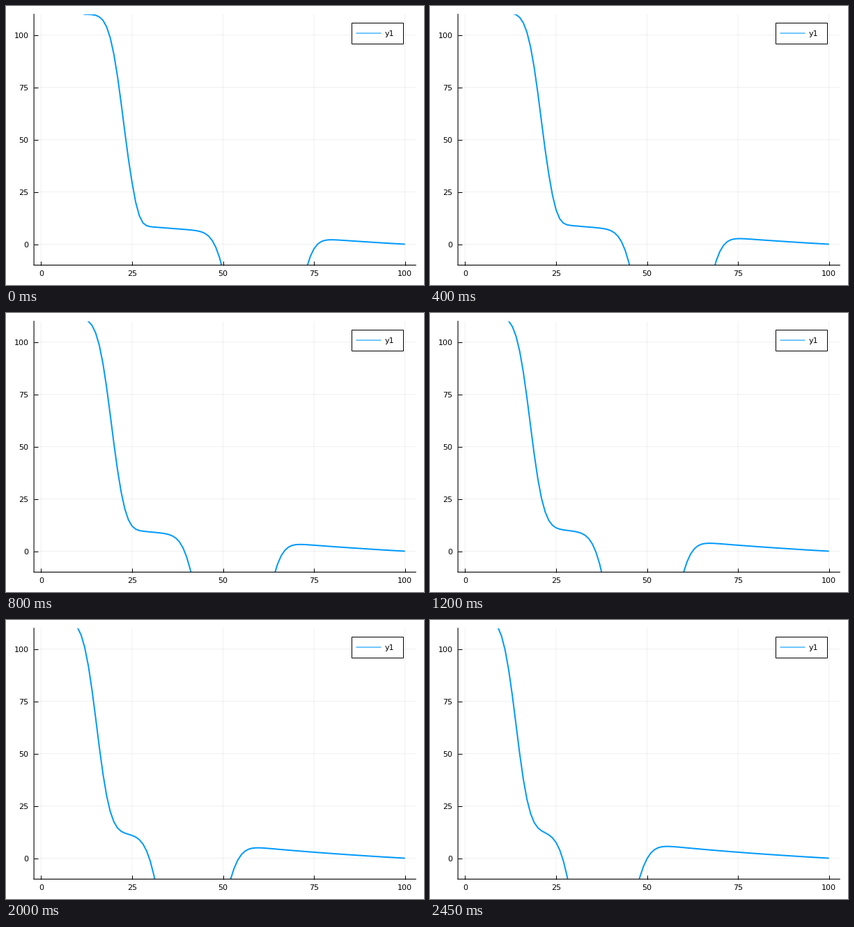
These frames come from a looping animation (600 by 400 pixels, 2.5 s). A matplotlib script:

```python
import math

import matplotlib.pyplot as plt
import numpy as np
from matplotlib.animation import FuncAnimation
from matplotlib.patches import Rectangle
from matplotlib.transforms import Affine2D

W, H, DPI = 600, 400, 100
FRAMES, INTERVAL = 50, 50
PX = 72 / DPI          # one pixel in points
BLUE = "#009AFA"
RATE = 0.0775          # leftward contraction per time unit
SOURCE = 10 * RATE     # uniform growth per time unit

x = np.arange(1, 101)
erf = np.vectorize(math.erf)


def cdf(z):
    return 0.5 * (1 + erf(z / math.sqrt(2)))


def profile(t):
    """Advected front and trough, with the steady log ramp on the right."""
    xi = x * math.exp(RATE * t)
    lift = SOURCE * t

    # Upper level falling through a smooth front to a sloping shelf
    top = 110 + np.maximum(11.7 - xi, 0) ** 2 + lift
    shelf = 7 - 0.135 * (xi - 40) + lift
    d = x - 22.57 * math.exp(-0.0785 * t)
    sharp = max(0.025 - 0.0085 * t, 0)
    z = (0.34 + 0.0002 * t * t) * d + sharp * np.maximum(d - 1.9, 0) ** 2
    left = top + (shelf - top) * cdf(z)

    # Trough, bounded by two soft edges
    edge_l = 49.63 * math.exp(-0.0963 * t)
    edge_r = 72.76 - 4.515 * t + 0.08 * t * t
    fall = cdf((0.277 + 0.0003 * t * t) * (x - edge_l) - 1)
    rise = cdf((0.286 - 0.0065 * t) * (edge_r - x) - 1)

    ramp = -10 * np.log(x / 100)
    base = np.where(x < (edge_l + edge_r) / 2, left, ramp)
    return base - 100 * fall * rise


plt.rcParams["font.family"] = "DejaVu Sans"
fig = plt.figure(figsize=(W / DPI, H / DPI), dpi=DPI, facecolor="white")
x0, x1, y0, y1 = 40.1, 588.19, 371.5, 11.81
ax = fig.add_axes([x0 / W, 1 - y0 / H, (x1 - x0) / W, (y0 - y1) / H])
ax.set(xlim=(-1.97, 102.97), ylim=(-10, 110),
       xticks=range(0, 101, 25), yticks=range(0, 101, 25))
ax.spines[["top", "right"]].set_visible(False)
ax.spines[["left", "bottom"]].set_linewidth(1.1 * PX)
ax.spines[["left", "bottom"]].set_snap(False)
ax.set_axisbelow(True)
ax.grid(color="black", alpha=0.06, linewidth=PX, snap=False)
ax.tick_params(direction="in", length=6 * PX, width=PX, labelsize=8)
ax.tick_params(axis="x", pad=5.4)
ax.tick_params(axis="y", pad=5.5)

curve, = ax.plot([], [], color=BLUE, lw=2 * PX, solid_capstyle="butt")

# Legend, placed in pixels from the top left corner
pixels = Affine2D().scale(1 / W, -1 / H).translate(0, 1) + fig.transFigure
ax.add_patch(Rectangle((496, 24), 74, 30, fc="white", ec="black", lw=PX,
                       transform=pixels, clip_on=False, zorder=5))
ax.plot([502.5, 538.5], [39, 39], color=BLUE, lw=1.1 * PX, snap=False,
        solid_capstyle="butt", transform=pixels, clip_on=False, zorder=6,
        scalex=False, scaley=False)
ax.text(544, 43, "y1", fontsize=8, va="baseline", transform=pixels, zorder=6)


def update(frame):
    curve.set_data(x, profile(frame / 8))
    return curve,


anim = FuncAnimation(fig, update, frames=FRAMES, interval=INTERVAL,
                     repeat=True, repeat_delay=0)
plt.show()
```
